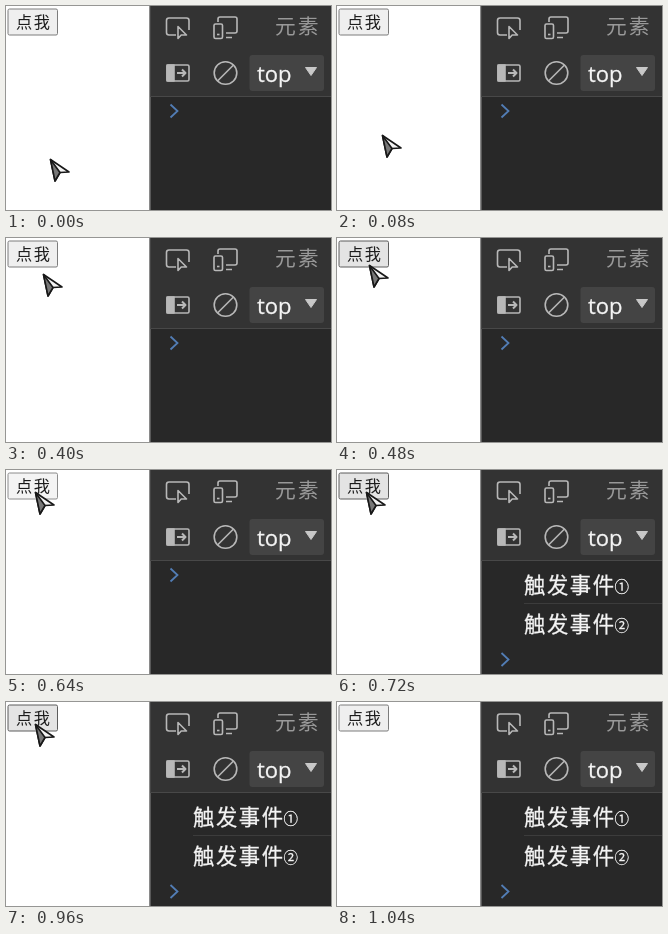
These frames come from a looping animation (325 px wide and 204 px high, 1.83 s). An HTML page:

```html
<!DOCTYPE html>
<html lang="zh-CN">
<head>
<meta charset="utf-8">
<style>
html, body { margin: 0; width: 100%; height: 100%; overflow: hidden; background: #fff; }
svg { display: block; width: 325px; height: 204px; }
text { font-family: "Noto Sans CJK SC", "Noto Sans CJK", sans-serif; }
.icon { fill: none; stroke: #b8b8b8; stroke-width: 1.6; stroke-linejoin: round; }
.light { fill: #f4f4f4; stroke: #f4f4f4; stroke-width: .3; }
.log { font-size: 21.3px; letter-spacing: 1.6px; }
.num { font-size: 14.5px; }
</style>
</head>
<body>
<svg viewBox="0 0 325 204">
  <rect width="325" height="204" fill="#fff"/>
  <rect id="button" x="2" y="3" width="49.500" height="26" rx="1.500"/>
  <text x="10" y="21.500" font-size="16.200" letter-spacing="1.500" fill="#1c1c1c">点我</text>

  <!-- Console panel -->
  <rect x="143" width="2" height="204" fill="#8a8a8a"/>
  <rect x="144.500" width="180.500" height="204" fill="#282828"/>
  <rect x="144.500" width="180.500" height="91" fill="#333"/>
  <path d="M145 90.5H325" stroke="#484848"/>
  <g class="icon">
    <path d="M170 29H163Q160.500 29 160.500 26.500V14.500Q160.500 12 163 12H180.500Q183 12 183 14.500V24"/>
    <path d="M172 20.500V32.500L175.200 29H180.500Z"/>
    <path d="M212 16V13Q212 11 214 11H229Q231 11 231 13V25Q231 27 229 27H220M220 31.500H226"/>
    <rect x="208" y="18" width="8.500" height="14.500" rx="1.500"/>
    <path d="M211 28.500H213.500"/>
    <rect x="161" y="59" width="22" height="16" rx="1.500"/>
    <path d="M161 59H168V75H161Z" fill="#b8b8b8"/>
    <path d="M171 67H179M176 63.500L179.500 67L176 70.500" stroke-width="2"/>
    <circle cx="219.500" cy="67" r="11.300"/>
    <path d="M211.500 75L227.500 59"/>
  </g>
  <text x="269" y="28" font-size="20.800" letter-spacing="2" fill="#999">元素</text>
  <rect x="243.500" y="49" width="74.500" height="36" rx="3" fill="#444"/>
  <text class="light" x="251" y="76" font-size="22" style="font-family:'Open Sans',sans-serif">top</text>
  <path d="M299.500 61.500H310.500L305 69.500Z" fill="#c8c8c8" stroke="#c8c8c8" stroke-linejoin="round"/>

  <g id="logs">
    <text class="light log" x="187" y="122.500">触发事件<tspan class="num" x="277.500" y="121.500">①</tspan></text>
    <path d="M187 133.500H325" stroke="#3c3c3c"/>
    <text class="light log" x="187" y="161.500">触发事件<tspan class="num" x="277.500" y="160.500">②</tspan></text>
  </g>
  <path id="prompt" d="M164.500 98.500L171.500 105L164.500 111.500" fill="none" stroke="#527db5" stroke-width="1.800"/>

  <g id="cursor" stroke="#181818" stroke-width="1.600" stroke-linejoin="round">
    <path d="M.5.5L19 13L10 13.500L5 22Z" fill="#f4f4f4"/>
    <path d="M.5.5L10 13.500L5 22Z" fill="#777"/>
  </g>
</svg>
<script>
const LOOP = 1830, STEP = 80;
const $ = id => document.getElementById(id);

// Pointer tip: [ms, x, y]
const path = [[0, 44, 153], [80, 45, 129], [160, 47, 97], [240, 48, 67],
  [320, 43, 48], [400, 37, 36], [480, 32, 27], [560, 29, 22]];

const buttonStates = {
  idle: ["#efefef", "#7c7c7c"],
  hover: ["#e4e4e4", "#5c5c5c"],
  pressed: ["#f4f4f4", "#8c8c8c"]
};

function draw(now) {
  const t = Math.floor(now % LOOP / STEP) * STEP;
  const [, x, y] = path.findLast(p => p[0] <= t);
  const gone = t >= 1040, logged = t >= 720;
  const state = t < 480 || gone ? "idle" : t === 640 ? "pressed" : "hover";
  const [fill, stroke] = buttonStates[state];

  $("button").setAttribute("fill", fill);
  $("button").setAttribute("stroke", stroke);
  $("cursor").setAttribute("transform", `translate(${x} ${y})`);
  $("cursor").style.display = gone ? "none" : "";
  $("logs").style.display = logged ? "" : "none";
  $("prompt").setAttribute("transform", `translate(0 ${logged ? 84.5 : 0})`);
}

const start = performance.now();
function tick() {
  draw(performance.now() - start);
  requestAnimationFrame(tick);
}
tick();
</script>
</body>
</html>
```
